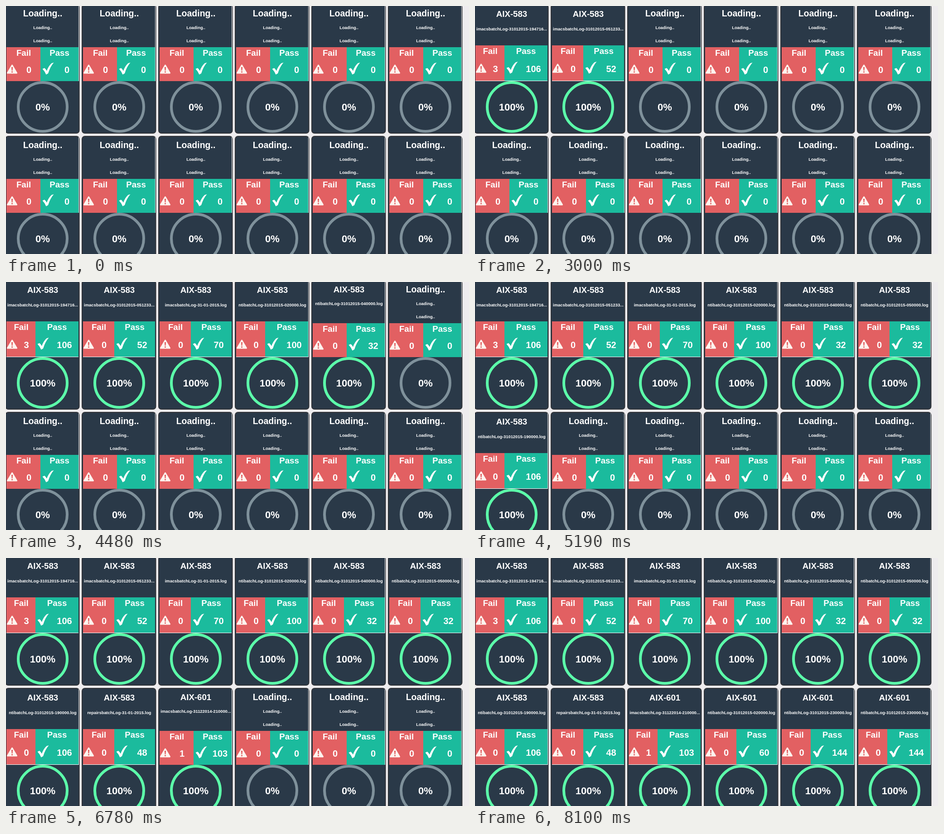
Write an HTML page with a canvas that moves like this. It is 1022 px wide and 548 px high and loops after 8.63 s.

```html
<!DOCTYPE html>
<html lang="en">
<head>
<meta charset="utf-8">
<title>Batch status board</title>
<style>
  html, body { margin: 0; width: 100%; height: 100%; overflow: hidden; background: #eeecee; }
  canvas { display: block; }
</style>
</head>
<body>
<canvas id="board" width="1022" height="548"></canvas>
<script>
const ctx = document.getElementById('board').getContext('2d');
const LOOP = 8630;
const COLUMN = 169, ROW = 291, COLUMNS = 6;
const COLOR = {
  page: '#eeecee', card: '#2a3948', edge: '#303338', fail: '#e26062', pass: '#1bbb9d',
  idle: '#7f919b', done: '#5cffaa', icon: '#fdf3ee', text: '#ffffff'
};

// ring: gauge fills; data: values arrive; settle: table takes its final layout
const card = (title, name, fail, pass, ring, data, settle, keepsLine) =>
  ({ title, name, fail, pass, ring, data, settle, keepsLine });

const cards = [
  card('AIX-583', 'imacsbatchLog-31012015-194716...', 3, 106, 1230, 1230, 1350, false),
  card('AIX-583', 'imacsbatchLog-31012015-051233...', 0, 52, 3000, 3000, 3000, false),
  card('AIX-583', 'imacsbatchLog-31-01-2015.log', 0, 70, 3600, 3600, 3600, false),
  card('AIX-583', 'ntibatchLog-31012015-020000.log', 0, 100, 4010, 4010, 4080, true),
  card('AIX-583', 'ntibatchLog-31012015-040000.log', 0, 32, 4480, 4480, 4550, true),
  card('AIX-583', 'ntibatchLog-31012015-050000.log', 0, 32, 4730, 4730, 4730, true),
  card('AIX-583', 'ntibatchLog-31012015-190000.log', 0, 106, 5050, 5190, 5190, true),
  card('AIX-583', 'repairsbatchLog-31-01-2015.log', 0, 48, 6450, 6450, 6530, false),
  card('AIX-601', 'imacsbatchLog-31122014-210000...', 1, 103, 6780, 6780, 6930, false),
  card('AIX-601', 'ntibatchLog-31012015-020000.log', 0, 60, 7560, 7560, 7630, true),
  card('AIX-601', 'ntibatchLog-31012015-230000.log', 0, 144, 7700, 7700, 7780, true),
  card('AIX-601', 'ntibatchLog-31012015-230000.log', 0, 144, 8000, 8000, 8100, true)
];

function rect(color, x, y, w, h) {
  ctx.fillStyle = color;
  ctx.fillRect(x, y, w, h);
}

function label(text, x, baseline, size) {
  ctx.font = `bold ${size}px "Liberation Sans", Arial, sans-serif`;
  ctx.fillStyle = COLOR.text;
  ctx.fillText(text, x, baseline);
}

function panel() {
  ctx.beginPath();
  ctx.roundRect(-2, -4, 164.5, 286, 7);
  ctx.fillStyle = COLOR.edge;
  ctx.fill();
  ctx.beginPath();
  ctx.roundRect(0, -2, 160.5, 282, 5);
  ctx.fillStyle = COLOR.card;
  ctx.fill();
}

function warning(y) {
  ctx.fillStyle = ctx.strokeStyle = COLOR.icon;
  ctx.lineWidth = 3;
  ctx.lineJoin = 'round';
  ctx.beginPath();
  ctx.moveTo(13.5, y + 2);
  ctx.lineTo(23.5, y + 19);
  ctx.lineTo(3.5, y + 19);
  ctx.closePath();
  ctx.fill();
  ctx.stroke();
  ctx.fillStyle = COLOR.fail;
  ctx.beginPath();
  ctx.moveTo(11.8, y + 6);
  ctx.lineTo(15.2, y + 6);
  ctx.lineTo(14.4, y + 14);
  ctx.lineTo(12.6, y + 14);
  ctx.fill();
  ctx.fillRect(12, y + 15.5, 3, 2.5);
}

function tick(x, y) {
  ctx.fillStyle = COLOR.text;
  ctx.beginPath();
  ctx.moveTo(x, y + 14);
  ctx.lineTo(x + 4.5, y + 12);
  ctx.quadraticCurveTo(x + 7, y + 14, x + 9.5, y + 18.5);
  ctx.quadraticCurveTo(x + 13, y + 8, x + 20, y + 1.5);
  ctx.lineTo(x + 25, y);
  ctx.quadraticCurveTo(x + 17, y + 9, x + 12.5, y + 24);
  ctx.lineTo(x + 8, y + 26.5);
  ctx.quadraticCurveTo(x + 5, y + 19, x, y + 14);
  ctx.fill();
}

function gauge(done) {
  ctx.strokeStyle = done ? COLOR.done : COLOR.idle;
  ctx.lineWidth = 6;
  ctx.beginPath();
  ctx.arc(81, 223, 54, 0, Math.PI * 2);
  ctx.stroke();
  label(done ? '100%' : '0%', 81, 231, 22);
}

function heading(item, loaded, settled) {
  if (loaded) {
    label(item.title, 81, settled ? 24 : 23, 18.67);
    label(item.name, 81, settled ? 54 : 51, 9.4);
  } else {
    label('Loading..', 81, 23, 19.5);
    label('Loading..', 81, 51, 9.4);
    label('Loading..', 81, 80, 9.4);
  }
}

function results(item, loaded, settled) {
  const split = !settled ? 76 : item.pass > 99 ? 65 : 70;
  const top = settled ? 87 : 91;
  const lift = settled ? 2 : 0;
  rect(COLOR.fail, 1, top, split - 1, 166 - top);
  rect(COLOR.pass, split, top, 160 - split, 166 - top);
  label('Fail', (1 + split) / 2 + 0.5, top + 19, 18.67);
  label('Pass', (split + 160) / 2, top + 19, 18.67);
  warning(129 - lift);
  label(loaded ? item.fail : 0, split / 2 + 12.5, 148 - lift, 20);
  tick(split + 4.5, 125 - lift);
  label(loaded ? item.pass : 0, split / 2 + 96.5, 148 - lift, 20);
  if (settled) rect(COLOR.text, 1, 165, 159, 1);
  if (!settled || item.keepsLine) rect('#e4e6e8', 160, -1, 1, 167);
}

function drawCard(item, index, time) {
  const loaded = time >= item.data;
  const settled = time >= item.settle;
  ctx.save();
  ctx.translate(index % COLUMNS * COLUMN, Math.floor(index / COLUMNS) * ROW);
  panel();
  heading(item, loaded, settled);
  results(item, loaded, settled);
  gauge(time >= item.ring);
  ctx.restore();
}

function render(now) {
  const time = now % LOOP;
  rect(COLOR.page, 0, 0, 1022, 548);
  ctx.textAlign = 'center';
  cards.forEach((item, index) => drawCard(item, index, time));
}

const start = performance.now();
function loop() {
  render(performance.now() - start);
  requestAnimationFrame(loop);
}
loop();
</script>
</body>
</html>
```
